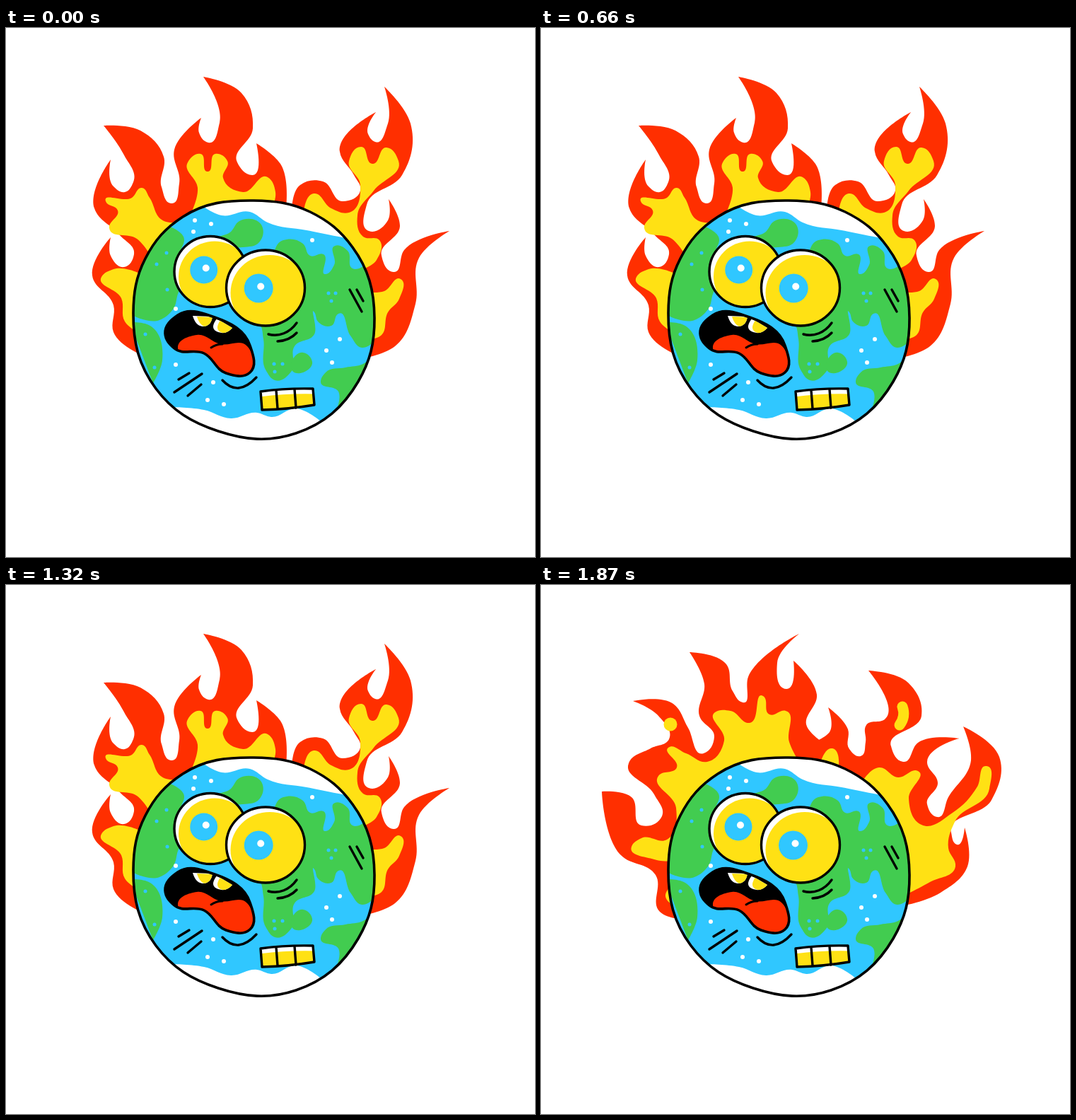
Write an HTML page with a canvas that moves like this. It is 748 px wide and 748 px high and loops after 1980 ms.

```html
<!DOCTYPE html>
<html lang="en">
<head>
<meta charset="utf-8">
<title>Burning globe</title>
<style>
html, body { margin: 0; width: 100%; height: 100%; overflow: hidden; background: #fff; }
canvas { display: block; width: 748px; height: 748px; }
</style>
</head>
<body>
<canvas id="stage" width="748" height="748"></canvas>
<script>
const ctx = document.getElementById('stage').getContext('2d');
const RED = '#ff2f00', YELLOW = '#ffe114', BLUE = '#30c7ff', GREEN = '#42cc50';
const STEP = 110;
const ORDER = [0, 1, 2, 3, 2, 1];

// Smooth curve through "x,y" points, bending like circle arcs; "!" marks a sharp corner.
function curve(text, closed) {
  const pts = text.trim().split(/\s+/).map(t => {
    const [x, y] = t.split(',').map(parseFloat);
    return { x, y, sharp: t.endsWith('!') };
  });
  const n = pts.length, path = new Path2D();
  if (!closed) pts[0].sharp = pts[n - 1].sharp = true;
  pts.forEach((p, i) => {
    const a = pts[(i + n - 1) % n], b = pts[(i + 1) % n];
    const u = (p.x - a.x) ** 2 + (p.y - a.y) ** 2, v = (b.x - p.x) ** 2 + (b.y - p.y) ** 2;
    const tx = (p.x - a.x) / u + (b.x - p.x) / v, ty = (p.y - a.y) / u + (b.y - p.y) / v;
    const k = p.sharp ? 0 : 0.37 / Math.hypot(tx, ty);
    p.dx = tx * k;
    p.dy = ty * k;
  });
  path.moveTo(pts[0].x, pts[0].y);
  for (let i = 0; i < (closed ? n : n - 1); i++) {
    const a = pts[i], b = pts[(i + 1) % n], d = Math.hypot(b.x - a.x, b.y - a.y);
    path.bezierCurveTo(a.x + a.dx * d, a.y + a.dy * d, b.x - b.dx * d, b.y - b.dy * d, b.x, b.y);
  }
  return path;
}

function fill(path, color) { ctx.fillStyle = color; ctx.fill(path); }
function stroke(d, color = '#000', width = 3.4) {
  ctx.strokeStyle = color;
  ctx.lineWidth = width;
  ctx.stroke(d instanceof Path2D ? d : new Path2D(d));
}
function oval(x, y, rx, ry = rx) {
  const path = new Path2D();
  path.ellipse(x, y, rx, ry, 0, 0, 7);
  return path;
}
function inside(path, draw) { ctx.save(); ctx.clip(path); draw(); ctx.restore(); }
const blob = (text, color) => fill(curve(text, true), color);
const red = text => fill(curve(text), RED);
const yellow = text => fill(curve(text), YELLOW);
const spot = (d, width) => stroke(d, YELLOW, width);
const dots = (text, r, color) => text.split(' ').forEach(t => fill(oval(...t.split(','), r), color));

const flames = [
  () => {
    red(`200,466 152,430 152,392 122,350 148,296! 148,322 167,338 181,320 160,292 125,255 148,186!
      152,224 168,232 180,218 166,178 138,138! 190,145 223,182 220,225 234,248 245,220 238,172 276,127!
      273,148 286,162 302,134 279,69! 333,92 349,142 327,190 348,208 354,163! 388,192 395,265`);
    red(`404,265 416,222 448,217 476,245 501,230 492,208 472,175 523,119! 512,150 522,161 540,135 535,83!
      572,135 560,208 510,250 513,287 540,272 541,242! 557,280 531,322 548,345 563,314 627,287!
      584,325 579,390 550,450 500,468`);
    yellow('195,435 168,415 163,382 135,352 152,341 200,352');
    yellow('212,335 185,298 146,283 158,258 141,245 178,240 192,226 203,240 220,271 265,272');
    yellow('255,275 271,226 257,190 275,178 285,203 296,178 313,188 307,212 335,232 370,211 381,232 373,262');
    yellow(`420,270 435,234 460,255 485,261 501,222 485,188 502,168 518,192 538,169 555,188 520,230
      497,265 505,295 528,300 524,328 490,345`);
    yellow('500,372 535,372 558,355 556,383 540,402 530,435 500,440');
  },
  () => {
    red(`210,473 168,462 162,410 113,382 86,292! 128,300 142,340 171,327 160,296 124,252 155,231 181,218
      166,185 130,164! 187,168 208,202 230,238 245,215 224,185 231,140 210,95! 262,112 271,150 285,166
      293,130 365,69! 334,110 347,147 357,107! 390,155 376,200 395,220! 395,265`);
    red(`393,265 393,219! 408,208 406,173! 434,204 436,232 452,242 459,222 460,198 486,190 463,121!
      519,138 538,185 495,228 512,250 533,223 591,217! 546,250 561,280 546,310 560,328 576,300 608,248
      597,200! 648,243 637,304 580,350 588,367 599,343! 603,398 565,435 500,456`);
    yellow('205,460 176,440 200,415');
    yellow(`205,390 160,388 128,370 142,358 178,360 191,315 166,270 192,258 180,230 205,238 235,250
      259,220 246,180 268,178 295,195 314,157 323,183 346,178 351,222 375,265`);
    yellow('392,262 412,231 420,268');
    yellow(`450,285 478,258 505,272 533,263 520,302 538,339 582,322 617,285 630,256 634,288 585,335
      576,372 586,398 550,420 500,446`);
    fill(oval(183, 197, 9.5), YELLOW);
    spot('M511 172Q516 186 507 198', 15);
  },
  () => {
    red(`215,488 164,465 150,411 101,375 109,328! 121,364 144,360 138,328 93,304! 132,293 156,312
      177,300 168,270 143,235 165,208 225,232 257,215 223,180 228,133 270,103! 261,140 276,159 300,128
      270,61! 325,90 331,144 305,192 321,207 341,195 343,155! 367,195 359,237 375,246! 375,262`);
    red(`372,262 372,246! 394,225 395,188 416,145 401,104! 444,137 438,178 455,191 468,168 465,108
      508,71! 494,115 501,132 509,94! 544,140 505,208 498,232 517,246 543,222 545,183! 579,235 551,288
      564,305 580,280 607,268 627,305 580,346 556,364 566,380 577,350! 592,390 560,444 490,479`);
    yellow('205,462 174,442 200,428');
    yellow(`205,414 142,400 150,378 175,370 161,333 202,312 200,288 171,250 198,240 230,252 258,218
      243,180 264,175 275,190 300,182 302,218 340,212 356,265`);
    yellow(`400,265 416,225 409,200 425,194 450,214 485,190 484,150 506,150 528,160 488,220 494,262
      543,272 535,315 556,328 533,355 560,393 530,422 495,460`);
    stroke('M508 150L509 168', RED, 4);
    spot('M602 298Q604 317 589 321', 17);
  },
  () => {
    red(`215,478 170,459 148,418 94,404 84,345 39,297! 103,302 125,325 136,305 103,255 116,220 95,175
      135,130! 122,165 138,215 131,258 158,278 186,258 155,212! 213,238 228,225 187,190 190,138 224,111!
      219,155 238,172 249,135 222,72! 294,120 284,195 300,208 313,187 345,139 372,175 375,212 384,215! 384,260`);
    red(`382,260 382,214! 400,192 386,135 438,66! 427,112 451,160 452,207 468,176 515,168 524,203
      522,243 550,205 538,130 527,87! 582,132 576,200 583,255 543,300 565,313 590,258 649,231! 616,275
      625,320 602,349 557,356 567,410 535,475 490,486`);
    yellow(`200,435 168,397 122,376 112,350 160,346 160,308 157,280 185,291 235,281 256,255 215,210
      225,186 248,195 258,170 271,195 288,230 330,215 335,171 356,185 362,218 382,222! 382,260`);
    yellow(`380,260 380,222! 405,190 402,140 424,130 432,182 445,221 495,192 497,220 484,255 528,266
      523,310 560,324 590,300 603,283 608,325 548,344 551,420 495,456`);
    spot('M115 187Q117 198 125 210', 12);
    spot('M267 118Q281 130 270 143', 14);
    spot('M562 142Q556 157 561 170T563 206', 11);
  }
];

const globe = curve(`180,403 197,326 250,267 350,244 430,260 490,310 521,410 498,500 410,573 300,570
  212,510`, true);

function land() {
  fill(globe, BLUE);
  blob('230,280! 251,295 245,325 265,353 246,370 236,398 217,413 170,402! 170,320!', GREEN);
  blob('175,416! 202,420 221,470 208,502!', GREEN);
  blob('293,303 318,288 330,273 362,280 358,303 335,310 310,308', GREEN);
  blob(`328,352 370,333 392,300 420,305 430,322 449,320 452,348 464,335 465,308 483,315 490,340
    515,330! 535,400! 524,440! 503,452 487,435 470,404 460,421 441,415 436,402 436,433 408,450
    404,485 380,498 368,485 364,440 360,420 331,395 358,378`, GREEN);
  blob('405,485 420,459 433,472', GREEN);
  blob('445,500 452,487 480,480 505,475 525,458! 520,520! 465,545! 470,514', GREEN);
  blob('275,250! 305,265 345,260 370,275 425,286 485,298! 440,230! 300,230!', '#fff');
  blob('235,536! 280,540 318,552 355,544 375,550 410,538 445,556! 400,590! 290,590!', '#fff');
  dots('267,272 290,277 265,288 433,300 240,397 240,476 293,501 285,526 308,532 472,440 453,456 461,473', 3, '#fff');
  dots('227,318 213,334 228,370 197,433 210,480 456,375 466,375 460,386 379,475 391,475 380,486', 2.5, BLUE);
}

function tooth(d) {
  const path = new Path2D(d);
  fill(path, '#fff');
  inside(path, () => { ctx.translate(6, 1); fill(path, YELLOW); });
}

function face() {
  const mouth = curve('225,432 243,406 295,409 345,449 345,487 311,488 280,460 238,453', true);
  fill(mouth, '#000');
  inside(mouth, () => {
    blob('243,453 270,434 303,447 340,449 342,490 312,487 280,459', RED);
    stroke('M290 452Q297 447 306 447', '#000', 3);
  });
  tooth('M264 407L292 408Q290 422 278 422Q268 421 264 407');
  tooth('M298 411L320 424Q312 434 300 430Q287 426 298 411');
  stroke(mouth, '#000', 3.6);
  stroke('M306 498Q328 522 354 494M371 433C386 437 401 431 411 417M384 443Q401 442 411 431');
  stroke('M244 497L259 488M238 515L277 489M257 520L276 504M486 370L503 401M496 370L505 386');

  const row = new Path2D('M360 514Q396 509 434 510L436 533Q400 539 362 540Z');
  fill(row, YELLOW);
  inside(row, () => stroke('M358 516Q396 511 437 512', '#fff', 11));
  stroke(row);
  stroke('M382 512L384 538M408 511L410 537');
}

function eye(x, y, rx, ry, px, py, pr) {
  const rim = oval(x, y, rx, ry);
  fill(rim, '#fff');
  inside(rim, () => fill(oval(x + 6, y + 7, rx, ry), YELLOW));
  fill(oval(px, py, pr), BLUE);
  fill(oval(px + 3, py - 2.5, 5), '#fff');
  stroke(rim);
}

function draw(pose) {
  ctx.fillStyle = '#fff';
  ctx.fillRect(0, 0, 748, 748);
  ctx.lineCap = ctx.lineJoin = 'round';
  flames[pose]();
  inside(globe, land);
  stroke(globe, '#000', 3.6);
  face();
  if (pose === 3) {
    stroke('M336 320A51 50 0 1 0 313 391M241 331Q277 343 312 353Q364 366 419 384');
    stroke(oval(367, 367.5, 55.5, 53.5));
  } else {
    const shift = pose === 0 ? 0.7 : 0;
    eye(289, 344.5, 51, 50, 279 + shift, 342, 19.5);
    eye(367, 367.5, 55.5, 53.5, 356.5 + shift, 368, 20.5);
  }
}

const start = performance.now();
let shown = -1;
function tick() {
  const pose = ORDER[Math.floor((performance.now() - start) / STEP) % ORDER.length];
  if (pose !== shown) draw(shown = pose);
  requestAnimationFrame(tick);
}
tick();
</script>
</body>
</html>
```
